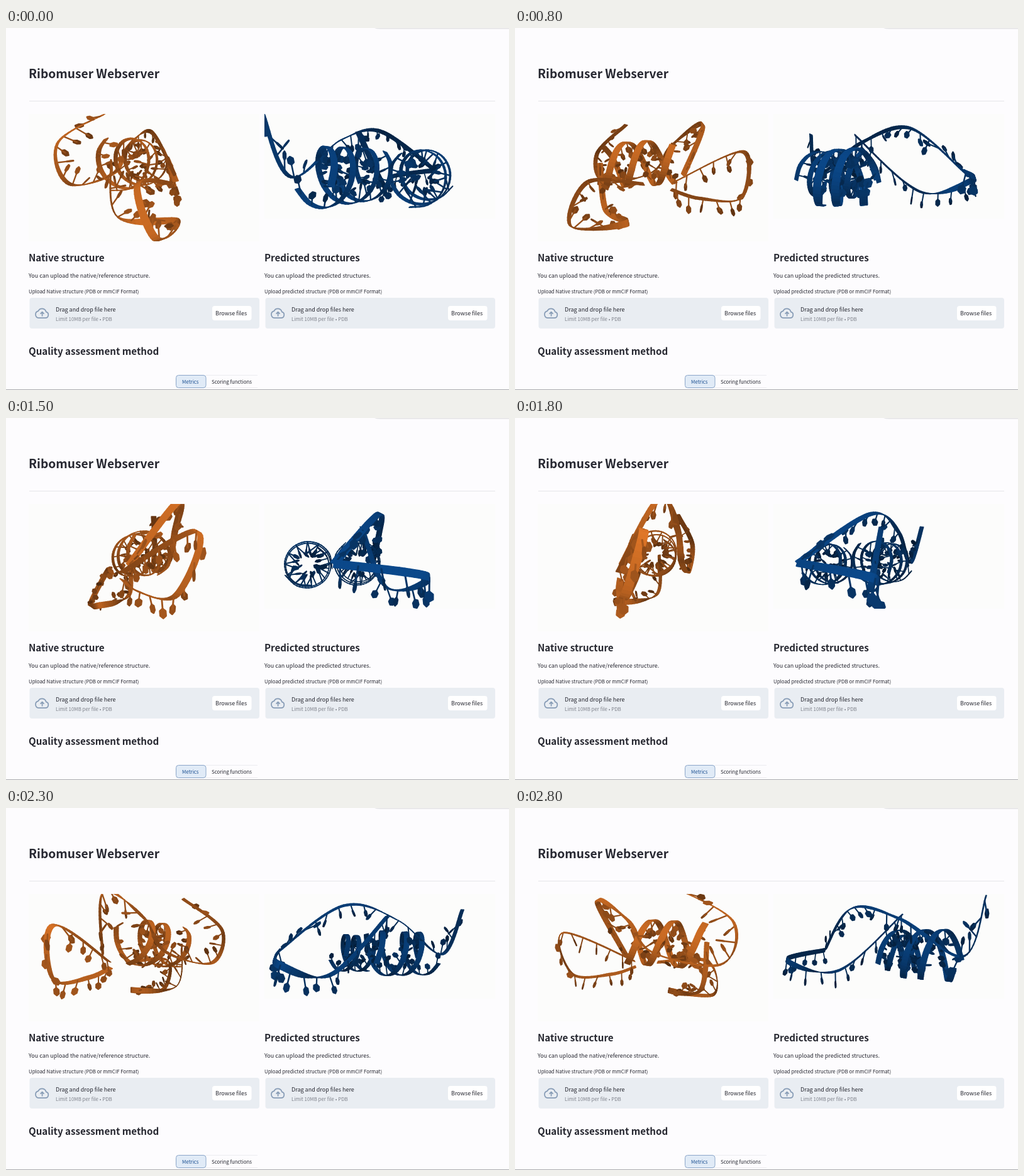
These frames come from a looping animation (800x577 px, 2900 ms). An HTML page with a canvas:

```html
<!DOCTYPE html>
<html lang="en">
<head>
<meta charset="utf-8">
<title>Structure upload</title>
<style>
html, body { margin: 0; width: 100%; height: 100%; overflow: hidden; background: #fdfcfe; }
svg, canvas { position: absolute; left: 0; top: 0; width: 800px; height: 577px; }
text { font-family: "Noto Sans CJK JP", "Noto Sans CJK SC", "Noto Sans CJK", "Open Sans", sans-serif; font-size: 9px; fill: #262730; }
.h1 { font-size: 19.2px; font-weight: 600; }
.h2 { font-size: 15.15px; font-weight: 600; }
.small { font-size: 7.87px; }
.muted { fill: #7f828b; }
.btn { fill: #1b4f91; }
</style>
</head>
<body>
<svg viewBox="0 0 800 577">
  <defs>
    <g id="drop">
      <rect x="1.5" y="430" width="365.5" height="49" rx="4" fill="#e9edf2"/>
      <path d="M16 462.2h10.5a5 5 0 0 0 1.2-9.8a6.6 6.6 0 0 0-12.4-1.2a5.6 5.6 0 0 0 .7 11zM21.6 459.5v-6.600M18.600 455.600l3-3l3 3" fill="none" stroke="#869bb5" stroke-width="1.7"/>
      <rect x="292" y="443" width="62.5" height="23" rx="4" fill="#fff"/>
      <text x="297" y="458">Browse files</text>
      <text class="small muted" x="43" y="466.5">Limit 10MB per file • PDB</text>
    </g>
  </defs>
  <path d="M586 0q3 1.600 8 1.600H800V0z" fill="#e4e4e6"/>
  <text class="h1" x="36" y="80">Ribomuser Webserver</text>
  <path d="M37 116.500H778" stroke="#e5e5e9"/>
  <path d="M36 137h367v203H36zM411 137h367v167H411z" fill="#fcfcfb"/>
  <text class="h2" x="36" y="372">Native structure</text>
  <text class="h2" x="411" y="372">Predicted structures</text>
  <text x="36" y="397.5">You can upload the native/reference structure.</text>
  <text x="411" y="397.5">You can upload the predicted structures.</text>
  <text class="small" x="36" y="422.5">Upload Native structure (PDB or mmCIF Format)</text>
  <text class="small" x="411" y="422.5">Upload predicted structure (PDB or mmCIF Format)</text>
  <use href="#drop" x="36"/>
  <use href="#drop" x="411"/>
  <text x="79" y="451.5">Drag and drop file here</text>
  <text x="454" y="451.5">Drag and drop files here</text>
  <text class="h2" x="36" y="521">Quality assessment method</text>
  <path d="M318 553.500H400M318 573.500H400" stroke="#ececf0"/>
  <rect x="270.5" y="553.5" width="47.5" height="20" rx="4" fill="#e1ebf7" stroke="#8ba6c8"/>
  <text class="small btn" x="280" y="567">Metrics</text>
  <text class="small" x="327" y="567">Scoring functions</text>
  <path d="M0 576.500H800" stroke="#a9a9ad"/>
</svg>
<canvas id="c" width="800" height="577"></canvas>
<script>
const ctx = document.getElementById('c').getContext('2d');
const FOCAL = 400;

const add = (a, b, k = 1) => a.map((v, i) => v + b[i] * k);
const dot = (a, b) => a[0] * b[0] + a[1] * b[1] + a[2] * b[2];
const cross = (a, b) => [a[1] * b[2] - a[2] * b[1], a[2] * b[0] - a[0] * b[2], a[0] * b[1] - a[1] * b[0]];
const unit = a => { const l = Math.hypot(...a) || 1; return a.map(v => v / l); };

function seeded(s) {
  return () => (s = (s * 16807) % 2147483647) / 2147483647;
}

// Catmull-Rom curve, sampled about every 5 units
function curve(p) {
  const out = [], at = i => p[Math.max(0, Math.min(p.length - 1, i))];
  for (let i = 0; i < p.length - 1; i++) {
    const [a, b, c, d] = [at(i - 1), at(i), at(i + 1), at(i + 2)];
    const steps = Math.ceil(Math.hypot(...add(c, b, -1)) / 5);
    for (let j = 0; j < steps; j++) {
      const t = j / steps;
      out.push(b.map((v, k) => v + t / 2 * (c[k] - a[k]
        + t * (2 * a[k] - 5 * v + 4 * c[k] - d[k] + t * (3 * (v - c[k]) + d[k] - a[k])))));
    }
  }
  out.push(at(p.length - 1));
  return out;
}

// The two strands of a double helix along an axis
function helix(from, to, radius, turns, phase) {
  const axis = add(to, from, -1), e1 = unit(cross(axis, [0, 0, 1])), e2 = unit(cross(axis, e1));
  return [0, 2.5].map(shift => {
    const pts = [], n = Math.round(turns * 10);
    for (let i = 0; i <= n; i++) {
      const a = phase + shift + turns * 2 * Math.PI * i / n;
      pts.push(add(add(add(from, axis, i / n), e1, radius * Math.cos(a)), e2, radius * Math.sin(a)));
    }
    return { pts };
  });
}

// Ribbon quads, sticks and hexagonal bases as 3D polygons
function build({ pts, hang }, width, rnd) {
  const p = curve(pts), n = p.length, polys = [];
  const at = i => p[Math.max(0, Math.min(n - 1, i))];
  let side = null;
  const frames = p.map((q, i) => {
    const tan = unit(add(at(i + 2), at(i - 2), -1));
    const c = Math.max(5, Math.min(n - 6, i));
    const bend = unit(add(add(at(c + 5), at(c - 5)), p[c], -2));
    let s = unit(cross(tan, bend));
    if (side) {
      if (dot(s, side) < 0) s = s.map(v => -v);
      s = unit(add(s, side, 2.5));
    }
    side = s;
    return { q, tan, bend, side };
  });
  frames.forEach(({ q, tan, bend, side }, i) => {
    if (i < n - 1) {
      const f = frames[i + 1];
      polys.push({ pts: [add(q, side, width), add(f.q, f.side, width), add(f.q, f.side, -width), add(q, side, -width)],
        normal: cross(tan, side), line: 1.5, tone: 1 });
    }
    if (i % 4 !== 2) return;
    const jit = [rnd() - .5, rnd() - .5, rnd() - .5];
    const dir = unit(add(hang ? [0, 1, 0] : bend, jit, .8));
    const up = unit(add(cross(dir, tan), tan, rnd() - .5));
    const end = add(q, dir, 13 + rnd() * 9), hex = [];
    for (let k = 0; k < 6; k++) {
      const a = k * Math.PI / 3;
      hex.push(add(add(end, dir, 5 * Math.cos(a)), up, 4.4 * Math.sin(a)));
    }
    polys.push({ pts: [q, end], line: 2, tone: .85 });
    polys.push({ pts: hex, normal: cross(dir, up), line: 2.4, tone: .8 });
  });
  return polys;
}

const models = [
  {
    cx: 217, cy: 235, box: [36, 137, 367, 203], rgb: [204, 108, 36], width: 4.3,
    strands: [
      { pts: [[-45, -90, -46], [-104, -42, -82], [-90, 12, -72], [0, -5, -48], [35, -52, -38], [84, -84, -10], [45, 0, 44]] },
      { pts: [[30, 10, 48], [143, -37, 8], [134, 32, 28], [70, 33, 42], [28, 20, 46]], hang: true },
      { pts: [[-11, 12, 48], [-95, 10, 25], [-112, 70, 52], [-32, 64, 62], [-75, 55, -10], [-85, -20, -15]] },
      ...helix([-80, -15, -10], [35, -22, 0], 36, 1.4, 0.4)
    ]
  },
  {
    cx: 578, cy: 220, box: [411, 137, 367, 167], rgb: [10, 66, 126], width: 3.9,
    strands: [
      { pts: [[-132, -62, -92], [-112, 14, -65], [-30, -40, -35], [46, -60, 8], [105, 8, 95]] },
      { pts: [[105, 8, 95], [148, 22, 5], [65, 40, 10], [-38, -50, -5]], hang: true },
      ...helix([-75, 16, 80], [-10, 12, 95], 35, 1.2, 0.5),
      ...helix([-115, 14, -35], [-15, 12, 15], 38, 1.6, 2)
    ]
  }
].map((m, i) => {
  const rnd = seeded(71 + i);
  return { ...m, polys: m.strands.flatMap(s => build(s, m.width, rnd)) };
});

function draw(m, angle) {
  const c = Math.cos(angle), s = Math.sin(angle);
  const turn = ([x, y, z]) => [x * c - z * s, y, z * c + x * s];
  const shapes = m.polys.map(({ pts, normal, line, tone }) => {
    const r = pts.map(turn), z = r.reduce((t, q) => t + q[2], 0) / r.length;
    const nrm = normal ? turn(unit(normal)) : [0, 0, .7];
    const lit = Math.abs(nrm[2] * .8 - nrm[1] * .5);
    return { r, z, line, shade: tone * (.56 + .42 * Math.min(1, lit) + z / 900) };
  }).sort((a, b) => a.z - b.z);

  ctx.save();
  ctx.beginPath();
  ctx.rect(...m.box);
  ctx.clip();
  ctx.lineJoin = 'round';
  for (const { r, z, line, shade } of shapes) {
    ctx.beginPath();
    for (const [x, y, d] of r) {
      const k = FOCAL / (FOCAL - d);
      ctx.lineTo(m.cx + x * k, m.cy + y * k);
    }
    ctx.closePath();
    ctx.fillStyle = ctx.strokeStyle = `rgb(${m.rgb.map(v => Math.round(v * shade))})`;
    ctx.lineWidth = line * FOCAL / (FOCAL - z);
    ctx.fill();
    ctx.stroke();
  }
  ctx.restore();
}

// The view turns 9 degrees every 100 ms and jumps back at the end of the loop
function tick() {
  const step = Math.floor(performance.now() % 2900 / 100);
  const angle = (step * 9 - 72) * Math.PI / 180;
  ctx.clearRect(0, 0, 800, 577);
  models.forEach(m => draw(m, angle));
  requestAnimationFrame(tick);
}
tick();
</script>
</body>
</html>
```
